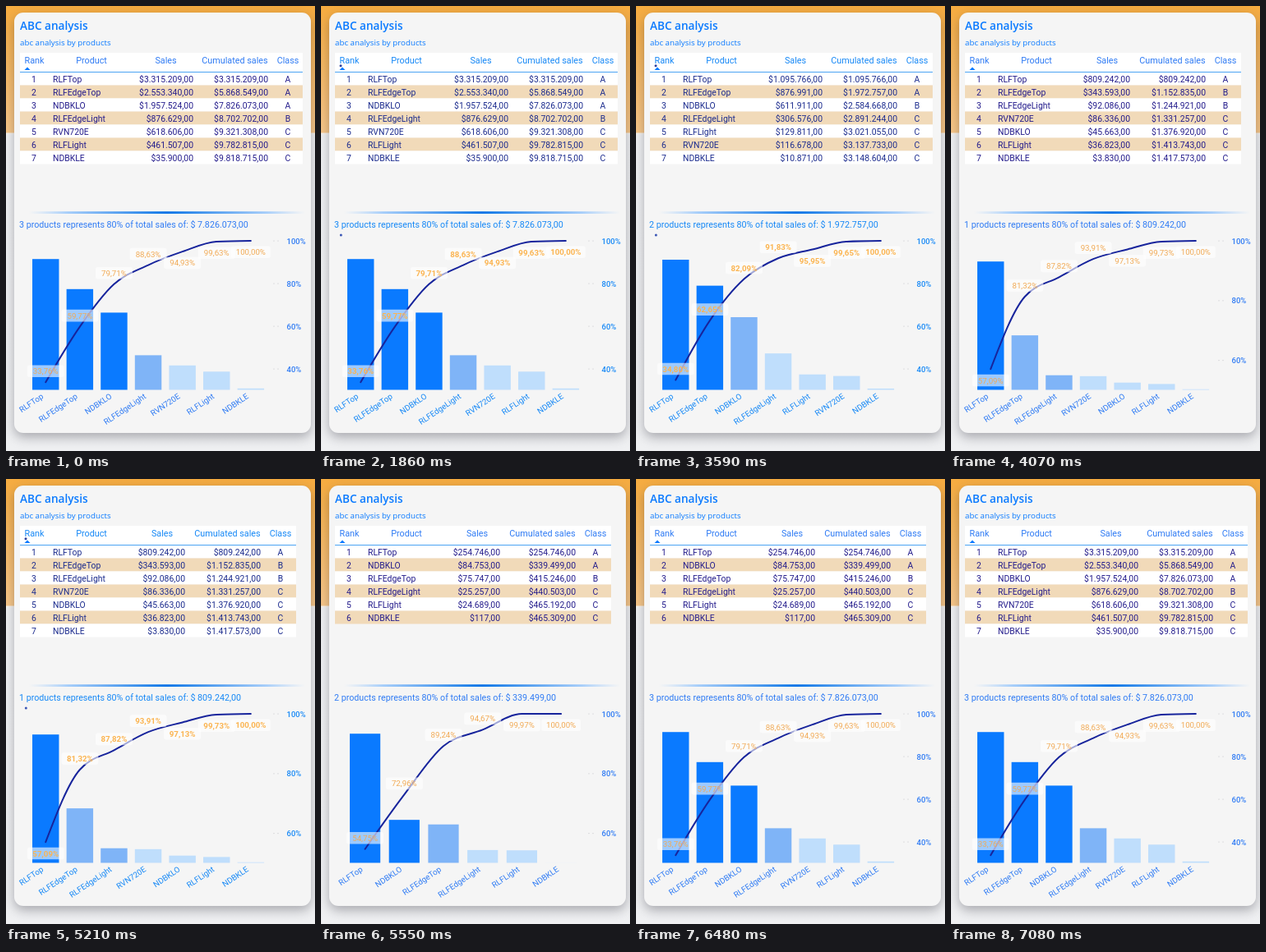
Write an HTML page that moves like this. It is 376 by 542 pixels and loops after 8.61 s.

```html
<!DOCTYPE html>
<html lang="en">
<head>
<meta charset="utf-8">
<title>ABC analysis</title>
<style>
  html, body { margin: 0; width: 100%; height: 100%; overflow: hidden; }
  body {
    position: relative;
    background: linear-gradient(#f6ac40, #f9c88a 154px, #fbf6ef 155px, #f1f2f4 157px, #eff0f2);
  }
  .card {
    position: absolute; left: 10px; top: 8px; width: 361px; height: 512px;
    border-radius: 11px; background: #f5f5f5;
    box-shadow: 0 5px 14px rgba(40, 40, 50, .36);
  }
  svg { position: absolute; left: 0; top: 0; width: 376px; height: 542px; }
  text { font-family: Roboto, "Open Sans", sans-serif; }
  .title { font: 600 13.6px "Open Sans", "Noto Sans", sans-serif; fill: #0a7aff; }
  .sub { font: 9.75px "Open Sans", "Noto Sans", sans-serif; fill: #0a7aff; }
  .head { font-size: 10.8px; fill: var(--blue); }
  .msg { font-size: 10.7px; fill: var(--blue); }
  .cell { font-size: 10.4px; fill: var(--navy); }
  .axis { font-size: 9.5px; font-weight: 500; fill: var(--blue); }
  .cat { font-size: 9.7px; fill: var(--blue); }
  .tag { font-size: 9.7px; fill: var(--amber); font-weight: var(--tagWeight); }
  #view { --blue: #2f7bf4; --navy: #241c8c; --amber: #f1aa55; --tagWeight: 400; }
  #view.busy { --blue: #1688f6; --navy: #1c2c8e; --amber: #fbb450; --tagWeight: 600; }
</style>
</head>
<body>
<div class="card"></div>
<svg viewBox="0 0 376 542">
  <defs>
    <linearGradient id="rule">
      <stop offset="0" stop-color="#b5d6fb" stop-opacity="0"/>
      <stop offset=".14" stop-color="#a5cdfa"/>
      <stop offset=".5" stop-color="#0873e6"/>
      <stop offset=".86" stop-color="#a5cdfa"/>
      <stop offset="1" stop-color="#b5d6fb" stop-opacity="0"/>
    </linearGradient>
  </defs>
  <text class="title" x="17" y="29">ABC analysis</text>
  <text class="sub" x="17" y="47.5">abc analysis by products</text>
  <rect x="28" y="250.2" width="336" height="2.8" fill="url(#rule)"/>
  <g id="view"><g id="table"></g><g id="chart"></g></g>
</svg>
<script>
const LOOP = 8610, STEP = 70, BASE = 467.5, TOP = 286;
const names = ["RLFTop", "RLFEdgeTop", "NDBKLO", "RLFEdgeLight", "RVN720E", "RLFLight", "NDBKLE"];
const barColor = { A: "#0a7aff", B: "#7fb4f7", C: "#bfdefc" };

// order: index into names; right: table edge; cols: right edge of sales, of cumulated, centre of class
const seven = { x0: 48.25, pitch: 41.6 };
const states = [
  { order: [0, 1, 2, 3, 4, 5, 6], sales: [3315209, 2553340, 1957524, 876629, 618606, 461507, 35900],
    ...seven, height: 159.3, scale: 2.6, right: 361, cols: [228, 319, 343], heads: [194.5, 278.5] },
  { order: [0, 1, 2, 3, 5, 4, 6], sales: [1095766, 876991, 611911, 306576, 129811, 116678, 10871],
    ...seven, height: 158.5, scale: 2.6, right: 361, cols: [227, 318, 342], heads: [194, 277.5] },
  { order: [0, 1, 3, 4, 2, 5, 6], sales: [809242, 343593, 92086, 86336, 45663, 36823, 3830],
    ...seven, height: 156.3, scale: 3.64, right: 353, cols: [218, 310, 334], heads: [190, 269.5], firstBelow: true },
  { order: [0, 2, 1, 3, 5, 6], sales: [254746, 84753, 75747, 25257, 24689, 117],
    x0: 53.6, pitch: 47.7, height: 157.3, scale: 3.64, right: 353, cols: [218, 310, 334], heads: [190, 269.5] }
];
// start of the chart change, its steps, time of the table change
const moves = [[1860, 4, 2330], [3590, 4, 4070], [5210, 3, 5550], [6340, 3, 6680]];

for (const s of states) {
  let sum = 0;
  s.cum = s.sales.map(v => sum += v);
  s.pct = s.cum.map(c => c / sum * 100);
  s.cls = s.pct.map(p => p <= 80 ? "A" : p <= 90 ? "B" : "C");
  s.bars = s.sales.map(v => v / s.sales[0] * s.height);
  s.dots = s.pct.map(p => TOP + (100 - p) * s.scale);
  s.xs = s.sales.map((_, i) => s.x0 + i * s.pitch);
}

const $ = id => document.getElementById(id);
const mix = (a, b, k) => a + (b - a) * k;
const money = v => String(v).replace(/\B(?=(\d{3})+$)/g, ".") + ",00";
const percent = p => p.toFixed(2).replace(".", ",") + "%";
const text = (cls, x, y, str, anchor = "start", extra = "") =>
  `<text class="${cls}" x="${x}" y="${y}" text-anchor="${anchor}" ${extra}>${str}</text>`;
const rect = (x, y, w, h, fill, extra = "") =>
  `<rect x="${x}" y="${y}" width="${w}" height="${h}" fill="${fill}" ${extra}/>`;
const dot = (x, y, r, fill) => `<circle cx="${x}" cy="${y}" r="${r}" fill="${fill}"/>`;

function drawTable(s, loading) {
  const w = s.right - 17, [sales, cum, cls] = s.cols;
  let out = rect(17, 57, w, 23, "#fff");
  s.sales.forEach((v, i) => {
    const y = 80.5 + i * 16, base = y + 12;
    out += rect(17, y, w, 16, i % 2 ? "#f1dab9" : "#fff")
      + text("cell", 34, base, i + 1, "middle")
      + text("cell", 57, base, names[s.order[i]])
      + text("cell", sales, base, "$" + money(v), "end")
      + text("cell", cum, base, "$" + money(s.cum[i]), "end")
      + text("cell", cls, base, s.cls[i], "middle");
  });
  out += rect(17, 80, w, 1, "#4ba3f3") + `<path d="M22.5 78L26 74.5L29.5 78Z" fill="#0a7aff"/>`;
  const heads = [["Rank", 34.5], ["Product", 104], ["Sales", s.heads[0]], ["Cumulated sales", s.heads[1]], ["Class", cls]];
  for (const [label, x] of heads) out += text("head", x, 70, label, "middle");
  if (loading) out += dot(24, 72.7, 1.5, "#2a3f9e");
  return out;
}

// monotone cubic through the points
function curve(xs, ys) {
  const n = xs.length, slope = [], tan = [];
  for (let i = 0; i < n - 1; i++) slope[i] = (ys[i + 1] - ys[i]) / (xs[i + 1] - xs[i]);
  for (let i = 1; i < n - 1; i++) {
    const a = slope[i - 1], b = slope[i];
    tan[i] = a * b <= 0 ? 0 : Math.sign(a) * Math.min(2 * Math.abs(a), 2 * Math.abs(b), Math.abs(a + b) / 2);
  }
  tan[0] = (3 * slope[0] - tan[1]) / 2;
  tan[n - 1] = (3 * slope[n - 2] - tan[n - 2]) / 2;
  let d = `M${xs[0]} ${ys[0]}`;
  for (let i = 1; i < n; i++) {
    const h = (xs[i] - xs[i - 1]) / 3;
    d += `C${xs[i - 1] + h} ${ys[i - 1] + tan[i - 1] * h} ${xs[i] - h} ${ys[i] - tan[i] * h} ${xs[i]} ${ys[i]}`;
  }
  return d;
}

function drawChart(from, to, k, loading) {
  const s = k > 0 ? to : from;
  const blend = (key, lost) => s[key].map((v, i) => k > 0 ? mix(from[key][i] ?? lost(v), v, k) : v);
  const xs = blend("xs", v => v), bars = blend("bars", () => 0), ys = blend("dots", () => TOP);
  const barW = s.pitch * .78, count = s.cls.filter(c => c === "A").length;
  let out = text("msg", 16, 270.3,
    `${count} products represents 80% of total sales of: $ ${money(s.cum[count - 1])}`);
  for (let p = 100; p >= (s.scale < 3 ? 40 : 60); p -= 20) {
    const y = TOP + (100 - p) * s.scale;
    out += text("axis", 341.5, y + 3.6, p + "%") + dot(326, y, .6, "#c4c4c8") + dot(331, y, .6, "#c4c4c8");
  }
  xs.forEach((x, i) => {
    out += rect(x - barW / 2, BASE - bars[i], barW, bars[i], barColor[s.cls[i]])
      + text("cat", x - 2, 477, names[s.order[i]], "end", `transform="rotate(-34 ${x - 2} 477)"`);
  });
  out += `<path d="${curve(xs, ys)}" fill="none" stroke="#17249c" stroke-width="2" stroke-linecap="round"/>`;
  xs.forEach((x, i) => {
    const below = ys[i] < 300.5 || (i === 0 && s.firstBelow);
    const y = ys[i] + (below ? 13.8 : -13.5), label = percent(s.pct[i]);
    const w = label.length > 6 ? 48 : 45;
    out += rect(x - w / 2, y - 7.3, w, 14.6, "#fff", 'rx="3" fill-opacity=".6"')
      + text("tag", x, y + 3.5, label, "middle");
  });
  if (loading) out += dot(24.3, 279, 1.5, "#3a55b5");
  return out;
}

let shown = "";
function frame(now) {
  const t = now % LOOP;
  let table = 0, from = 0, to = 0, step = 0, steps = 2;
  moves.forEach(([start, n, swap], i) => {
    if (t >= start) {
      from = i;
      to = (i + 1) % states.length;
      steps = n;
      step = Math.min(n - 1, Math.floor((t - start) / STEP));
    }
    if (t >= swap) table = (i + 1) % states.length;
  });
  const key = [table, from, to, step].join();
  if (key !== shown) {
    shown = key;
    const moving = from !== to && step < steps - 1, loading = moving && step === 0;
    $("view").setAttribute("class", moving ? "busy" : "");
    $("table").innerHTML = drawTable(states[table], loading);
    $("chart").innerHTML = drawChart(states[from], states[to], step / (steps - 1), loading);
  }
  requestAnimationFrame(frame);
}
frame(performance.now());
</script>
</body>
</html>
```
